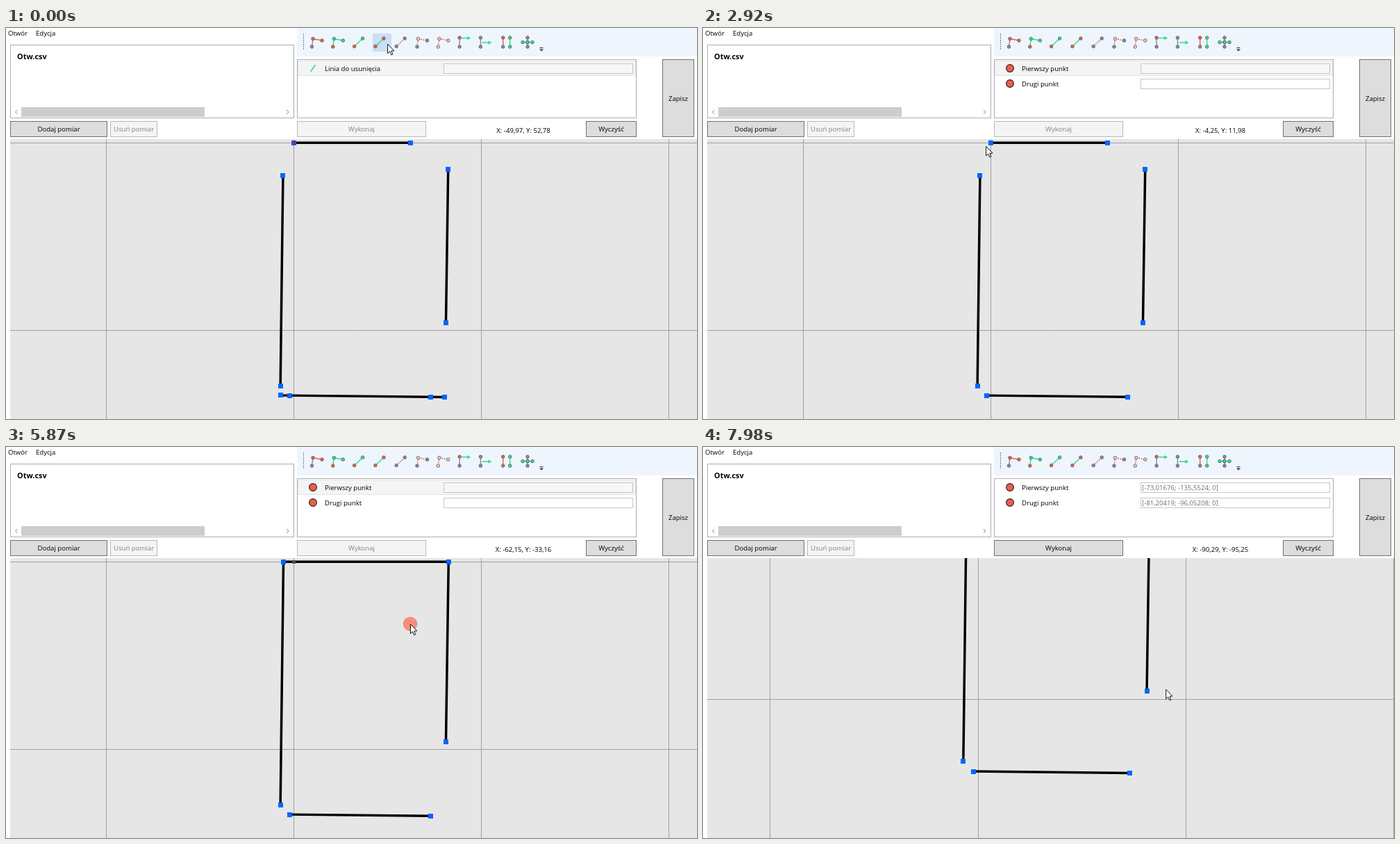
Write an HTML page with a canvas that moves like this. It is 995x563 px and loops after 8000 ms.

```html
<!DOCTYPE html>
<html lang="pl">
<head>
<meta charset="utf-8">
<title>Edytor pomiarów</title>
<style>
html, body { margin: 0; width: 100%; height: 100%; overflow: hidden; background: #fff; }
canvas { display: block; }
</style>
</head>
<body>
<canvas id="stage" width="995" height="563"></canvas>
<script>
const ctx = document.getElementById('stage').getContext('2d');
const LOOP = 8000, LAG = 80, REACT = 110;
const FONT = '"Open Sans", "Noto Sans", sans-serif';
const RED = '#e8604a', GREEN = '#2be08a', GRAY = '#8a8a98', PALE = '#f3c4ba', BLUE = '#0066ff';

// Drawing units: x grows to the left, y grows upwards
const origin = [0, 0], topEnd = [-62.22222, 0];
const leftTop = [5.67, -17.56], leftLow = [7.07, -129.8];
const rightTop = [-82.41, -14.26], rightLow = [-81.20419, -96.05208];
const lowA = [2.22, -134.75], lowB = [-73.01676, -135.5524];
const stubA = [7.11, -134.7], stubB = [-80.5, -135.65];
const toolButton = [-12.6, 53.3], runButton = [-36.3, 7];

const mid = (a, b) => [(a[0] + b[0]) / 2, (a[1] + b[1]) / 2];
const ramp = (t, a, b) => Math.min(1, Math.max(0, (t - a) / (b - a)));
const meetTop = ([ax, ay], [bx, by]) => [ax + (ax - bx) / (ay - by) * -ay, 0];

// Pointer stops: arrival, departure, place and what a click there does
const STOPS = [
  [0, 30, [-49.97, 52.78]],
  [740, 950, mid(lowB, stubB), 'cutB'],
  [1540, 1720, mid(lowA, stubA), 'cutA'],
  [1930, 2180, [-9.34, -120.04]],
  [2500, 2620, toolButton, 'tool'],
  [2840, 2840, [-4.34, 12.15]],
  [2920, 3020, [2.6, -1.8]],
  [3060, 3160, origin, 'pick'],
  [3340, 3440, leftTop, 'pick'],
  [3700, 4250, runButton, 'run'],
  [4650, 4650, [-64.03, 0.59]],
  [4730, 4730, [-71.1, 1.2]],
  [4860, 4960, rightTop, 'pick'],
  [5150, 5230, topEnd, 'pick'],
  [5460, 5600, runButton, 'run'],
  [5790, 6600, [-62.15, -33.16]],
  [6830, 6990, lowB, 'pick'],
  [7160, 7340, [-86.63, -119.19]],
  [7540, 7690, rightLow, 'pick'],
  [7900, LOOP, [-90.29, -95.25]]
];
const PAN = [6000, 6400], ZOOM = 6450;

function pointer(t) {
  const i = STOPS.findIndex(s => t <= s[1]);
  const [arrive, , to] = STOPS[i];
  if (t >= arrive) return to;
  const [, leave, from] = STOPS[i - 1];
  const u = ramp(t, leave, arrive);
  return from.map((v, n) => v + (to[n] - v) * u);
}

function stateAt(t) {
  const s = { picks: [], runs: 0 };
  for (const [arrive, , point, act] of STOPS) {
    if (!act || t < arrive + REACT) continue;
    if (act === 'pick') s.picks.push(point);
    else if (act === 'run') { s.runs++; s.picks = []; }
    else s[act] = true;
  }
  return s;
}

function viewAt(t) {
  if (t >= ZOOM) return { x: 396.02, y: 63.75, k: 2.993 };
  return { x: 414.2, y: 165.3 - 91.8 * ramp(t, ...PAN), k: 2.7 };
}

const toScreen = (v, [x, y]) => [v.x - x * v.k, v.y - y * v.k];

function text(s, x, y, { color = '#000', align = 'left', size = 9.6, weight = 400 } = {}) {
  ctx.font = `${weight} ${size}px ${FONT}`;
  ctx.textAlign = align;
  ctx.fillStyle = color;
  ctx.fillText(s, x, y);
}

function box(x, y, w, h, fill, border) {
  ctx.fillStyle = fill;
  ctx.fillRect(x, y, w, h);
  if (!border) return;
  ctx.strokeStyle = border;
  ctx.lineWidth = 1;
  ctx.strokeRect(x + 0.5, y + 0.5, w - 1, h - 1);
}

function trace(points) {
  ctx.beginPath();
  points.forEach(([x, y]) => ctx.lineTo(x, y));
}

function line(points, color, width = 1, dash = []) {
  ctx.strokeStyle = color;
  ctx.lineWidth = width;
  ctx.setLineDash(dash);
  trace(points);
  ctx.stroke();
  ctx.setLineDash([]);
}

function fill(points, color) {
  ctx.fillStyle = color;
  trace(points);
  ctx.fill();
}

function disc(x, y, r, color, stroke, width = 1) {
  ctx.beginPath();
  ctx.arc(x, y, r, 0, 7);
  ctx.fillStyle = color;
  ctx.fill();
  if (!stroke) return;
  ctx.strokeStyle = stroke;
  ctx.lineWidth = width;
  ctx.stroke();
}

function button(label, x, y, w, h, on = true) {
  box(x, y, w, h, on ? '#dddddd' : '#f4f4f4', on ? '#707070' : '#b5b8ba');
  text(label, x + w / 2, y + h / 2 + 3.5, { color: on ? '#000' : '#838383', align: 'center' });
}

function square(x, y, size, color) {
  box(Math.round(x - size / 2), Math.round(y - size / 2), size, size, color);
}

function drawScene(t, state) {
  const view = viewAt(t), step = view.k * 100;
  const hover = pointer(Math.max(0, t - LAG));
  ctx.save();
  ctx.beginPath();
  ctx.rect(6, 160, 989, 403);
  ctx.clip();
  box(6, 160, 989, 403, '#e6e6e6');
  for (let i = -1; i <= 2; i++) {
    const x = Math.floor(view.x + i * step) + 0.5, y = Math.floor(view.y + i * step) + 0.5;
    line([[x, 160], [x, 563]], '#a0a0a0');
    line([[6, y], [995, y]], '#a0a0a0');
  }

  const leftJoined = state.runs > 0, rightJoined = state.runs > 1;
  const left = leftJoined ? meetTop(leftTop, leftLow) : leftTop;
  const right = rightJoined ? meetTop(rightTop, rightLow) : rightTop;
  const segments = [
    [leftJoined ? left : origin, rightJoined ? right : topEnd],
    [left, leftLow], [right, rightLow], [lowA, lowB]
  ];
  if (!state.cutA) segments.push([stubA, lowA]);
  if (!state.cutB) segments.push([lowB, stubB]);

  for (const s of segments) line(s.map(p => toScreen(view, p)), '#000', 3.5);
  for (const p of segments.flat()) {
    const near = Math.hypot(p[0] - hover[0], p[1] - hover[1]) < 3;
    square(...toScreen(view, p), 7, near ? '#e04030' : BLUE);
  }
  if (!state.tool || leftJoined) {
    const color = rightJoined ? '#4c5058' : leftJoined ? '#d84a38' : '#7a3090';
    square(...toScreen(view, origin), 5, color);
  }
  ctx.restore();
}

// Toolbar icons: shape, node colours, edge colours, dashed
const COLORS = { r: RED, g: GREEN, n: GRAY, p: PALE };
const CORNER = [[-7.5, 6.5], [-6, -5], [7, -2.5]];
const DIAGONAL = [[-7, 6], [5, -5.5]];
const POST = [[-7, 6.5], [-7, -6.5]];
const ICONS = [
  [CORNER, 'nrr', 'nr'], [CORNER, 'rgg', 'gg'],
  [DIAGONAL, 'rg', 'g'], [DIAGONAL, 'rr', 'g'], [DIAGONAL, 'nn', 'r', true],
  [CORNER, 'npn', 'rr', true], [CORNER, 'ppp', 'rr', true],
  [POST, 'nr', 'n'], [POST, 'nn', 'n']
];

function nodes(cx, shape, dots, edges, dashed) {
  const pts = shape.map(([x, y]) => [cx + x, 20.5 + y]);
  [...edges].forEach((c, i) =>
    line([pts[i], pts[i + 1]], COLORS[c], 1.4, dashed ? [2, 1.5] : []));
  [...dots].forEach((c, i) => disc(...pts[i], 2.3, COLORS[c], '#5f5a5a', 0.8));
}

function arrow(x, y) {
  line([[x, y], [x + 11, y]], GREEN, 1.5);
  fill([[x + 9, y - 2.7], [x + 14, y], [x + 9, y + 2.7]], GREEN);
}

function drawToolbar(t) {
  box(419, 0, 576, 41, '#eef5fd');
  for (let y = 8; y < 32; y += 3) box(428, y, 1, 1.5, '#555');
  if (t < 300) box(528, 8, 27, 26, '#c9dff5');

  const center = i => 448 + 30.3 * i;
  ICONS.forEach((icon, i) => nodes(center(i), ...icon));
  arrow(center(7) - 5, 14.5);
  arrow(center(8) - 5, 21);
  nodes(center(9) + 2, POST, 'nr', 'r');
  nodes(center(9) + 12, POST, 'gg', 'g');
  nodes(center(10), [[-7, 0], [0, 0], [7, 0]], 'gng', 'gg');
  nodes(center(10), [[0, -6.5], [0, 0], [0, 6.5]], 'ngn', 'nn');
  line([[768.5, 28.5], [773.5, 28.5]], '#333');
  fill([[768, 30.5], [774, 30.5], [771, 33.5]], '#333');
}

const comma = s => String(s).replace('.', ',');
const place = p => p ? `[${p.map(n => comma(+n.toPrecision(7))).join('; ')}; 0]` : '';

function row(y, label, value, active) {
  if (active) box(420, y - 11, 487, 22, '#f4f4f4', '#e4e4e4');
  text(label, 459, y + 3.5);
  box(630, y - 7, 273, 15, active ? '#f7f7f7' : '#fff', '#c4c6ca');
  text(value, 632, y + 4, { color: '#6d6d6d' });
}

function drawPanels(t, { tool, picks }) {
  text('Otwór', 3, 11);
  text('Edycja', 43, 11);
  box(6, 24, 409, 106, '#fff', '#abadb3');
  text('Otw.csv', 16, 45, { size: 10.9, weight: 700 });
  box(22, 114, 264, 14, '#cdcdcd');
  line([[16.5, 118], [13.5, 121], [16.5, 124]], '#888');
  line([[404, 118], [407, 121], [404, 124]], '#888');

  box(419, 45, 489, 85, '#fff', '#abadb3');
  if (tool) {
    ['Pierwszy punkt', 'Drugi punkt'].forEach((label, i) => {
      const y = 58 + 22 * i;
      row(y, label, place(picks[i]), picks.length === i);
      disc(442, y, 5.4, RED, '#2a1a18', 1.1);
    });
  } else {
    row(58, 'Linia do usunięcia', '', true);
    line([[438.5, 63], [445.5, 53]], GREEN, 1.6);
  }

  button('Dodaj pomiar', 6, 134, 140, 23);
  button('Usuń pomiar', 150, 134, 68, 23, false);
  button('Wykonaj', 419, 134, 186, 23, picks.length === 2);
  button('Wyczyść', 835, 134, 73, 23);
  button('Zapisz', 945, 45, 46, 112);

  const [x, y] = pointer(Math.max(0, t - LAG)).map(n => comma(n.toFixed(2)));
  text(`X: ${x}, Y: ${y}`, 745, 151, { align: 'center' });
}

function drawPointer(t) {
  const [x, y] = toScreen(viewAt(t), pointer(t));
  const dragging = t >= 5830 && t < PAN[1];
  const pressed = STOPS.some(([arrive, , , act]) => act && t >= arrive + 30 && t < arrive + 140);
  if (dragging || pressed) disc(x, y, 10.3, 'rgba(250,95,70,0.65)');
  const outline = [[0, 0], [0, 13.5], [3.1, 10.7], [5.3, 15.6], [7.4, 14.7], [5.3, 9.9], [9.4, 9.7], [0, 0]]
    .map(([px, py]) => [x + px + 0.4, y + py + 0.3]);
  fill(outline, '#fff');
  line(outline, '#111');
}

function frame() {
  const t = performance.now() % LOOP, state = stateAt(t);
  box(0, 0, 995, 563, '#fff');
  drawScene(t, state);
  drawToolbar(t);
  drawPanels(t, state);
  drawPointer(t);
  requestAnimationFrame(frame);
}
frame();
</script>
</body>
</html>
```
